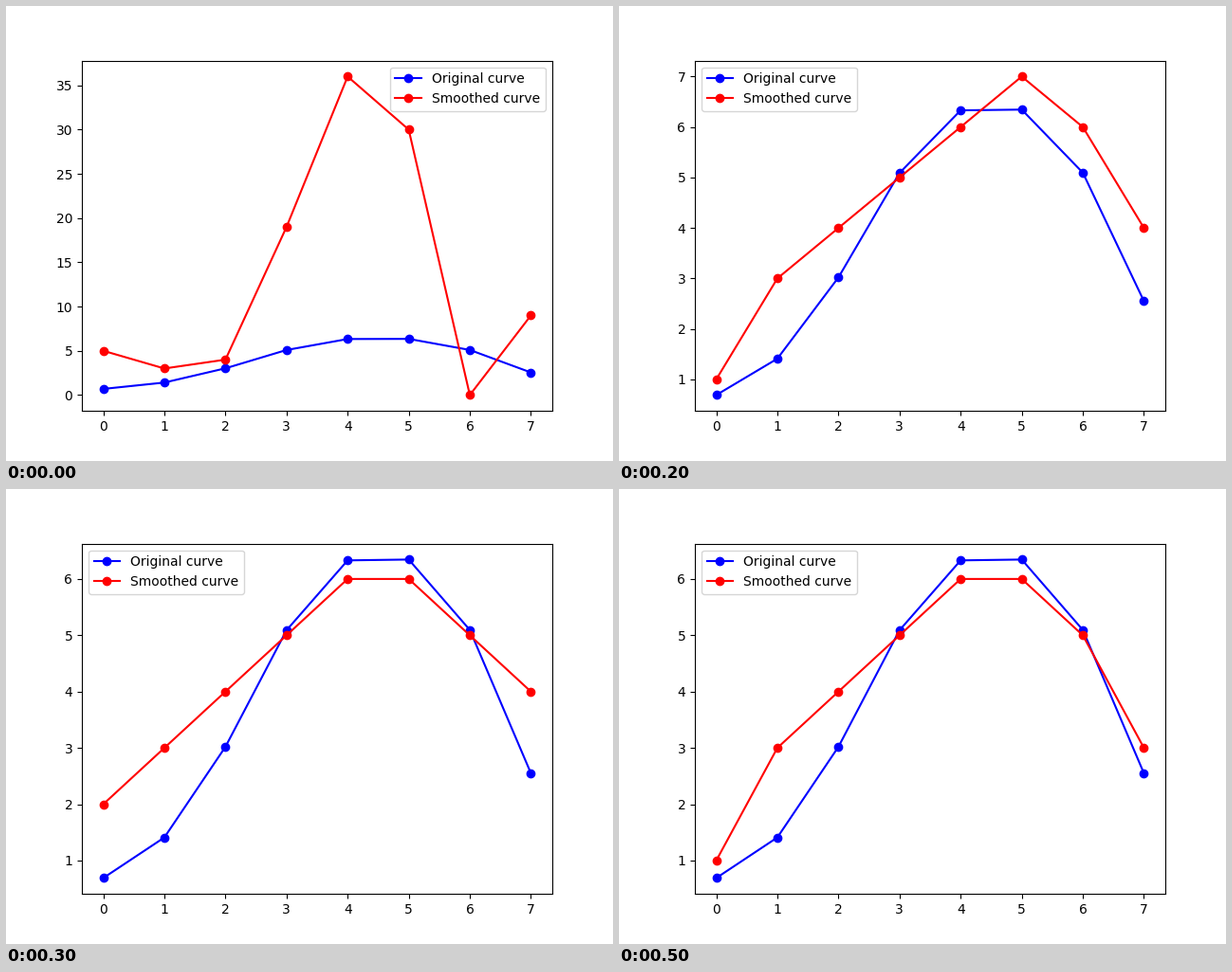
A matplotlib script for the animation above (0.6 s loop, 640 px wide and 480 px high).

```python
import matplotlib.pyplot as plt
from matplotlib.animation import FuncAnimation

ORIGINAL = [0.69, 1.41, 3.02, 5.09, 6.33, 6.345, 5.095, 2.55]

# Candidate curve at each step of the search
SMOOTHED = [
    [5, 3, 4, 19, 36, 30, 0, 9],
    [1, 3, 4, 5, 7, 7, 6, 4],
    [1, 3, 4, 5, 6, 7, 6, 4],
    [2, 3, 4, 5, 6, 6, 5, 4],
    [2, 3, 4, 5, 6, 6, 5, 3],
    [1, 3, 4, 5, 6, 6, 5, 3],
]

plt.rcParams["font.family"] = "DejaVu Sans"
fig, ax = plt.subplots(figsize=(6.4, 4.8), dpi=100)


def draw(step):
    # Clearing lets the axis limits and legend adapt to each curve.
    ax.clear()
    ax.plot(ORIGINAL, "bo-", label="Original curve")
    ax.plot(SMOOTHED[step], "ro-", label="Smoothed curve")
    ax.legend(loc="best")


anim = FuncAnimation(fig, draw, frames=len(SMOOTHED), interval=100,
                     init_func=lambda: None, repeat=True, repeat_delay=0)
plt.show()
```
